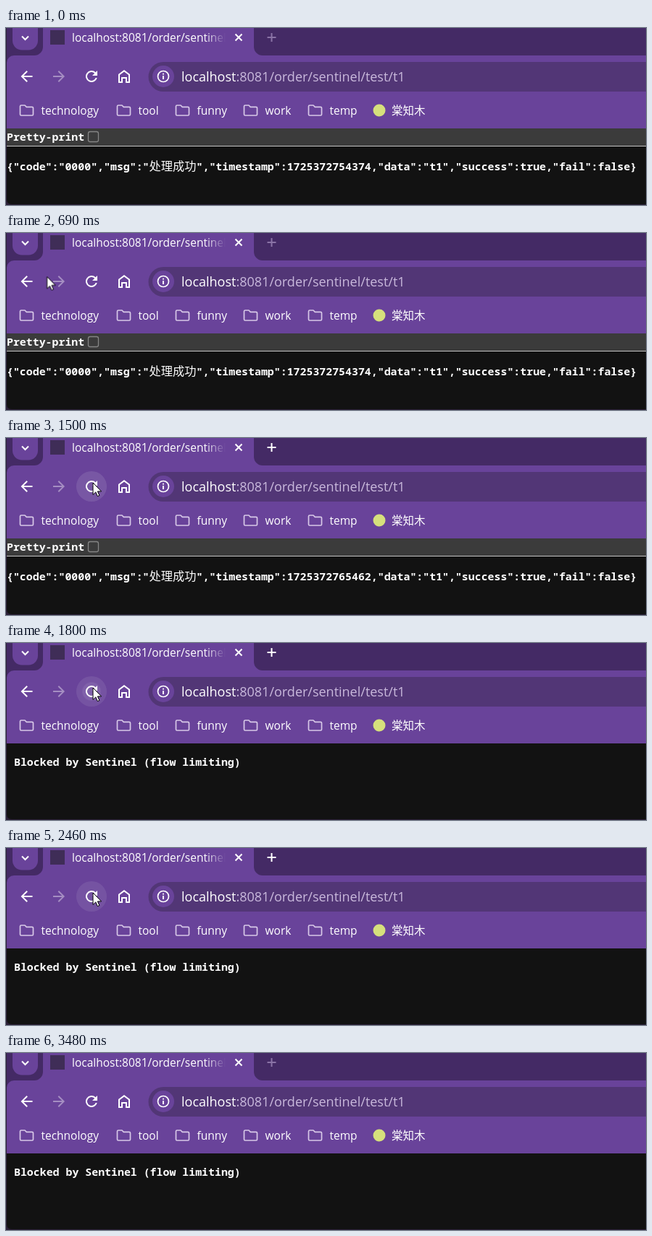
Recreate the animation shown at these times as an HTML page. Size 883 by 245 pixels, loop 3.6 s.

```html
<!DOCTYPE html>
<html lang="en">
<head>
<meta charset="utf-8">
<title>Flow limiting demo</title>
<style>
html, body { margin: 0; width: 100%; height: 100%; overflow: hidden; background: #2b2038; }
svg { display: block; width: 883px; height: 245px; }
text { font: 500 15.5px "Open Sans", "Noto Sans CJK SC", "Noto Sans CJK", sans-serif; fill: #fff; }
.title { fill: url(#fade); }
.url { font-size: 18px; }
.mono, .mono text { font: 600 14.9px "Noto Sans Mono", "Liberation Mono", monospace; }
.mono .cjk { font: 500 16.25px "Noto Sans CJK SC", "Noto Sans CJK", sans-serif; }
.icon { fill: #fff; }
.line { fill: none; stroke: #fff; stroke-width: 2; }
.thin { stroke-width: 1.7; }
.folder { fill: none; stroke: #d8c9e8; stroke-width: 1.7; stroke-linejoin: round; }

/* one 3600 ms loop for everything */
.anim { animation: 3.6s step-end infinite; }
#plus { animation-name: plus; }
#hover { animation-name: hover; animation-timing-function: linear; }
#ripple { animation-name: ripple; animation-timing-function: linear; }
#pointer { animation-name: move; }
#arrow { animation-name: arrow; }
#resize { animation-name: resize; }
#bar { animation-name: bar; }
#blocked { animation-name: blocked; }
#reply0 { animation-name: reply0; }
#reply1 { animation-name: reply1; }
#reply2 { animation-name: reply2; }
#reply3 { animation-name: reply3; }

@keyframes plus {
  0% { stroke: #8a73a6; }
  25% { stroke: #fff; }
  96.65%, 100% { stroke: #8a73a6; }
}
@keyframes hover {
  0%, 22.5% { opacity: 0; }
  25%, 73.3% { opacity: .09; }
  79%, 100% { opacity: 0; }
}
@keyframes ripple {
  0%, 29.1% { transform: scale(.2); opacity: 0; }
  29.2% { transform: scale(.2); opacity: .09; }
  32.5% { transform: scale(1); opacity: .09; }
  35% { transform: scale(1); opacity: 0; }
  36.6% { transform: scale(.2); opacity: 0; }
  36.7% { transform: scale(.2); opacity: .09; }
  40% { transform: scale(1); opacity: .09; }
  42.5% { transform: scale(1); opacity: 0; }
  48.2% { transform: scale(.2); opacity: 0; }
  48.3% { transform: scale(.2); opacity: .09; }
  51.7%, 56.5% { transform: scale(1); opacity: .09; }
  59.2%, 100% { transform: scale(1); opacity: 0; }
}
@keyframes move {
  0% { transform: translate(868px, 98px); visibility: hidden; }
  2.49% { transform: translate(868px, 98px); visibility: visible; animation-timing-function: steps(11); }
  11.65% { transform: translate(0, 63px); visibility: visible; }
  12.49% { transform: translate(6px, 62px); visibility: visible; animation-timing-function: steps(5); }
  16.65% { transform: translate(24px, 62px); visibility: visible; animation-timing-function: steps(8); }
  23.32% { transform: translate(111px, 58px); visibility: visible; }
  28.32% { transform: translate(111px, 58px); visibility: visible; animation-timing-function: steps(4); }
  31.65% { transform: translate(120px, 62px); visibility: visible; }
  72.49% { transform: translate(150px, 72px); visibility: visible; }
  73.32% { transform: translate(300px, 104px); visibility: visible; }
  74.15% { transform: translate(615px, 161px); visibility: visible; }
  74.99%, 100% { transform: translate(615px, 161px); visibility: hidden; }
}
@keyframes arrow {
  0% { opacity: 1; }
  11.65% { opacity: 0; }
  12.49%, 100% { opacity: 1; }
}
@keyframes resize {
  0% { opacity: 0; }
  11.65% { opacity: 1; }
  12.49%, 100% { opacity: 0; }
}
@keyframes bar {
  0% { opacity: 1; }
  49.16% { opacity: 0; }
  53.32% { opacity: 1; }
  58.32%, 100% { opacity: 0; }
}
@keyframes blocked {
  0% { opacity: 0; }
  49.16% { opacity: 1; }
  53.32% { opacity: 0; }
  58.32%, 100% { opacity: 1; }
}
@keyframes reply0 {
  0% { opacity: 1; }
  30.82%, 100% { opacity: 0; }
}
@keyframes reply1 {
  0% { opacity: 0; }
  30.82% { opacity: 1; }
  39.16%, 100% { opacity: 0; }
}
@keyframes reply2 {
  0% { opacity: 0; }
  39.16% { opacity: 1; }
  49.16%, 100% { opacity: 0; }
}
@keyframes reply3 {
  0% { opacity: 0; }
  53.32% { opacity: 1; }
  58.32%, 100% { opacity: 0; }
}
</style>
</head>
<body>
<svg viewBox="0 0 883 245">
  <defs>
    <linearGradient id="fade" gradientUnits="userSpaceOnUse" x1="274" x2="303" y1="0" y2="0">
      <stop stop-color="#fff"/>
      <stop offset="1" stop-color="#fff" stop-opacity="0"/>
    </linearGradient>
    <path id="back" d="M7.800 13L13.400 18.600L12 20L4 12L12 4L13.400 5.400L7.800 11H20V13Z"/>
    <path id="folder" class="folder" d="M1 2.500Q1 1 2.500 1H7.500L9.800 3.300H17.500Q19 3.300 19 4.800V13.500Q19 15 17.500 15H2.500Q1 15 1 13.500Z"/>
  </defs>

  <!-- tab strip -->
  <path fill="#442a65" d="M1 0H883V60H1Z"/>
  <rect x="9" y="-12" width="35" height="42.500" rx="13" fill="#69439a"/>
  <path class="line" d="M22 11.500l4.500 4.500l4.500-4.500"/>
  <path fill="#69439a" d="M39 38A12 12 0 0 0 51 26V0H342V26A12 12 0 0 0 354 38H883V139H1V48A10 10 0 0 1 11 38Z"/>
  <rect x="61" y="3" width="20" height="20" fill="#3f2d57"/>
  <text class="title" x="91" y="19">localhost:8081/order/sentinel</text>
  <path class="line" d="M316.500 8.500l9 9m0-9l-9 9"/>
  <path id="plus" class="line anim" d="M360.500 13h12M366.500 7v12"/>

  <!-- toolbar -->
  <use href="#back" class="icon" transform="translate(16.500 55)"/>
  <use href="#back" class="icon" opacity=".4" transform="matrix(-1 0 0 1 85 55)"/>
  <g transform="translate(118 67)">
    <circle id="hover" class="anim" r="21" fill="#fff" opacity="0"/>
    <circle id="ripple" class="anim" r="21" fill="#fff" opacity="0"/>
    <path class="icon" d="M5.650-5.650A8 8 0 1 0 7.730 2H5.650A6 6 0 1 1 4.220-4.220L1-1H8V-8Z"/>
  </g>
  <path class="icon" d="M155 76V64L163 58L171 64V76H165V70H161V76ZM157 74H159V68H167V74H169V65L163 60.500L157 65Z"/>
  <path fill="#523676" d="M883 47H217A20.500 20.500 0 0 0 217 88H883Z"/>
  <circle cx="217" cy="67" r="15" fill="#69439a"/>
  <circle cx="217" cy="67" r="7.500" class="line thin"/>
  <path class="line" d="M217 66v5M217 62.700v1.800"/>
  <text class="url" x="242" y="74">localhost<tspan fill="#c9b9dc">:8081/order/sentinel/test/t1</tspan></text>

  <!-- bookmarks -->
  <g id="marks"></g>
  <circle cx="515" cy="114" r="8.500" fill="#d6e07c"/>
  <text x="532" y="120">棠知木</text>

  <!-- page -->
  <path fill="#121212" d="M1 139H883V244H8Q1 244 1 237Z"/>
  <g id="bar" class="anim mono">
    <path fill="#3b3b3b" d="M1 139H883V163H1Z"/>
    <path fill="#c4c4c4" d="M1 163H883V164H1Z"/>
    <text x="1" y="156">Pretty-print</text>
    <rect x="113.500" y="143.500" width="14" height="14" rx="2.500" fill="#3b3b3b" stroke="#858585" stroke-width="1.300"/>
  </g>
  <g id="replies" class="mono"></g>
  <text id="blocked" class="anim mono" x="11" y="170" opacity="0">Blocked by Sentinel (flow limiting)</text>

  <!-- mouse pointer -->
  <g id="pointer" class="anim" visibility="hidden">
    <path id="arrow" class="anim" fill="#fff" stroke="#000" d="M0 0V16.500L3.800 12.900L6.300 18.600L8.900 17.500L6.400 11.900H11.600Z"/>
    <path id="resize" class="anim" opacity="0" fill="#fff" stroke="#000" stroke-width=".8" d="M-1-1.200H2V-4.500L6.500 0L2 4.500V1.200H-1Z"/>
  </g>
</svg>
<script>
const fill = (id, parts) => document.getElementById(id).innerHTML = parts.join('');

const folders = [['technology', 18.5], ['tool', 152.5], ['funny', 233.5], ['work', 327.5], ['temp', 416.5]];
fill('marks', folders.map(([name, x]) =>
  `<use href="#folder" x="${x}" y="106"/><text x="${x + 30}" y="120">${name}</text>`));

const stamps = [1725372754374, 1725372765187, 1725372765462, 1725372766069];
fill('replies', stamps.map((time, i) =>
  `<text id="reply${i}" class="anim" x="1" y="197">{"code":"0000","msg":"<tspan class="cjk">处理成功</tspan>` +
  `","timestamp":${time},"data":"t1","success":true,"fail":false}</text>`));
</script>
</body>
</html>
```
